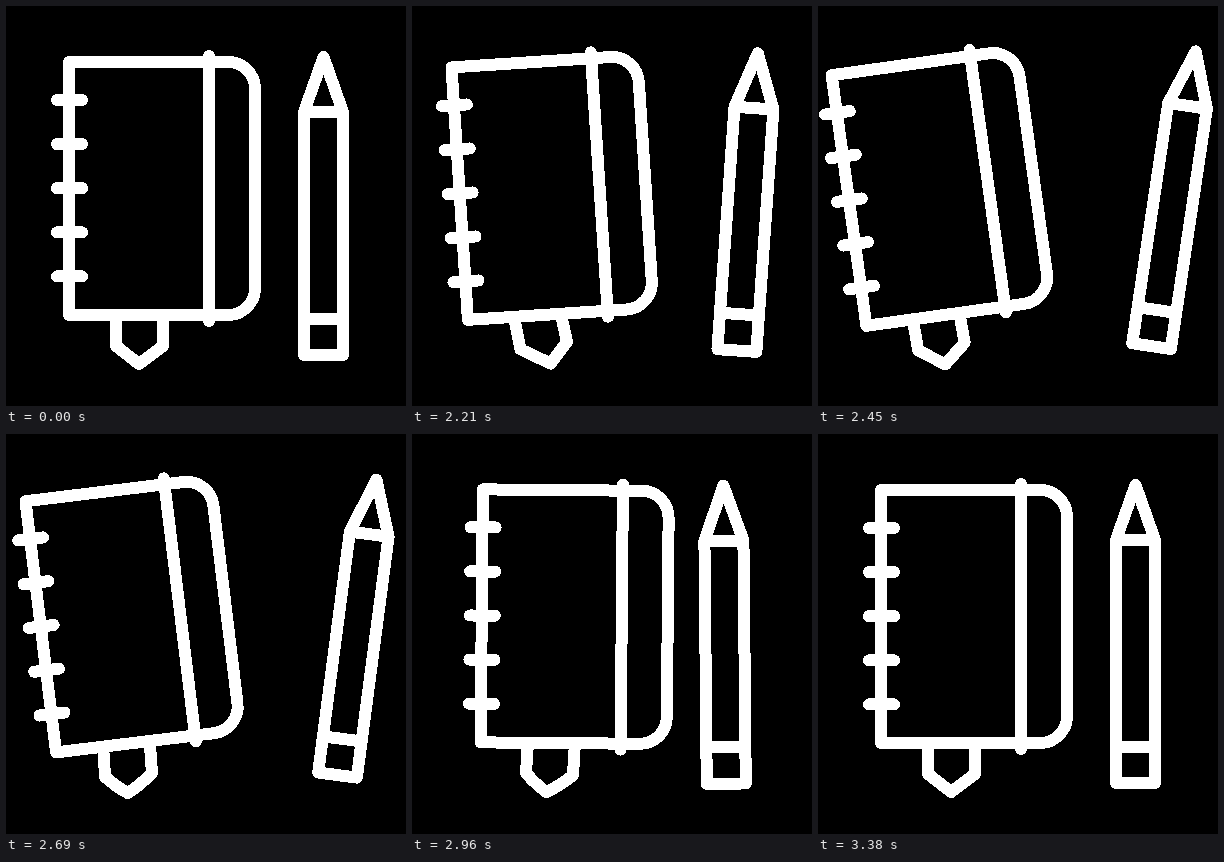
Write an HTML page that moves like this. It is 400 px wide and 400 px high and loops after 3.41 s.

```html
<!DOCTYPE html>
<html lang="en">
<head>
<meta charset="utf-8">
<title>Notebook and pencil</title>
<style>
  html, body { margin: 0; width: 100%; height: 100%; overflow: hidden; background: #000; }
  svg { display: block; width: 100%; height: 100%; }
  path {
    fill: none; stroke: #fff; stroke-width: 12;
    stroke-linecap: round; stroke-linejoin: round;
    shape-rendering: crispEdges;
  }
</style>
</head>
<body>
<svg viewBox="0 0 400 400">
  <g id="book">
    <path id="ribbon"/>
    <path d="M63 56H222A27 27 0 0 1 249 83V282A27 27 0 0 1 222 309H63Z"/>
    <path d="M203 50V315"/>
    <path id="rings"/>
  </g>
  <g id="pencil">
    <path d="M298 106L317.5 51L337 106V349H298ZH337M298 312.5H337"/>
  </g>
</svg>
<script>
const LOOP = 3410, START = 2030, STEP = 30;
const LEAN = 2010, PEAK = 2520, REBOUND = 3020, REST = 3380;
const OVERSHOOT = 0.2;

const [book, pencil, ribbon, rings] =
  ["book", "pencil", "ribbon", "rings"].map(id => document.getElementById(id));

rings.setAttribute("d", Array.from({ length: 5 }, (_, i) => `M51 ${94 + 44.1 * i}H76`).join(""));

// Sine ease from 0 to 1 between two times; skew moves its midpoint.
function ease(t, from, to, skew = 1) {
  const u = Math.min(1, Math.max(0, (t - from) / (to - from)));
  return Math.sin(Math.PI / 2 * u ** skew) ** 2;
}

// 0 upright, 1 fully leaning, negative on the rebound.
function swing(t) {
  return ease(t, LEAN, PEAK, 0.8)
    - (1 + OVERSHOOT) * ease(t, PEAK, REBOUND, 1.37)
    + OVERSHOOT * ease(t, REBOUND, REST);
}

// The ribbon trails behind the swing, more loosely on the way out.
function sway(t) {
  const speed = swing(t + STEP) - swing(t - STEP);
  return speed * (speed > 0 ? 55 : 27);
}

function ribbonPath(s) {
  const lx = 110 + 0.35 * s, ly = 340 + 0.18 * s;
  const rx = 157 + 0.35 * s, ry = 340 - 0.28 * s;
  const tip = 133 + s, sag = Math.max(0, -s) * 0.6;
  return `M110 309V315L${lx} ${ly}`
    + `Q${(lx + tip) / 2} ${(ly + 358) / 2 + sag} ${tip} 358`
    + `Q${(rx + tip) / 2} ${(ry + 358) / 2 + sag} ${rx} ${ry}L157 315V309`;
}

// Past upright, part of the turn becomes a sideways slide.
function pose(el, p, angle, slide, pivot) {
  const over = Math.max(0, -p);
  const turn = angle * (p + over / 2);
  el.setAttribute("transform", `translate(${slide * over} 0) rotate(${turn} ${pivot})`);
}

function draw(now) {
  const raw = now % LOOP;
  const t = raw < START ? 0 : START + Math.floor((raw - START) / STEP) * STEP;
  const p = swing(t);
  pose(book, p, -8.15, 37, "134 420");
  pose(pencil, p, 8.8, -18, "385 452");
  ribbon.setAttribute("d", ribbonPath(sway(t)));
}

const begin = performance.now();
function tick() {
  draw(performance.now() - begin);
  requestAnimationFrame(tick);
}
tick();
</script>
</body>
</html>
```
